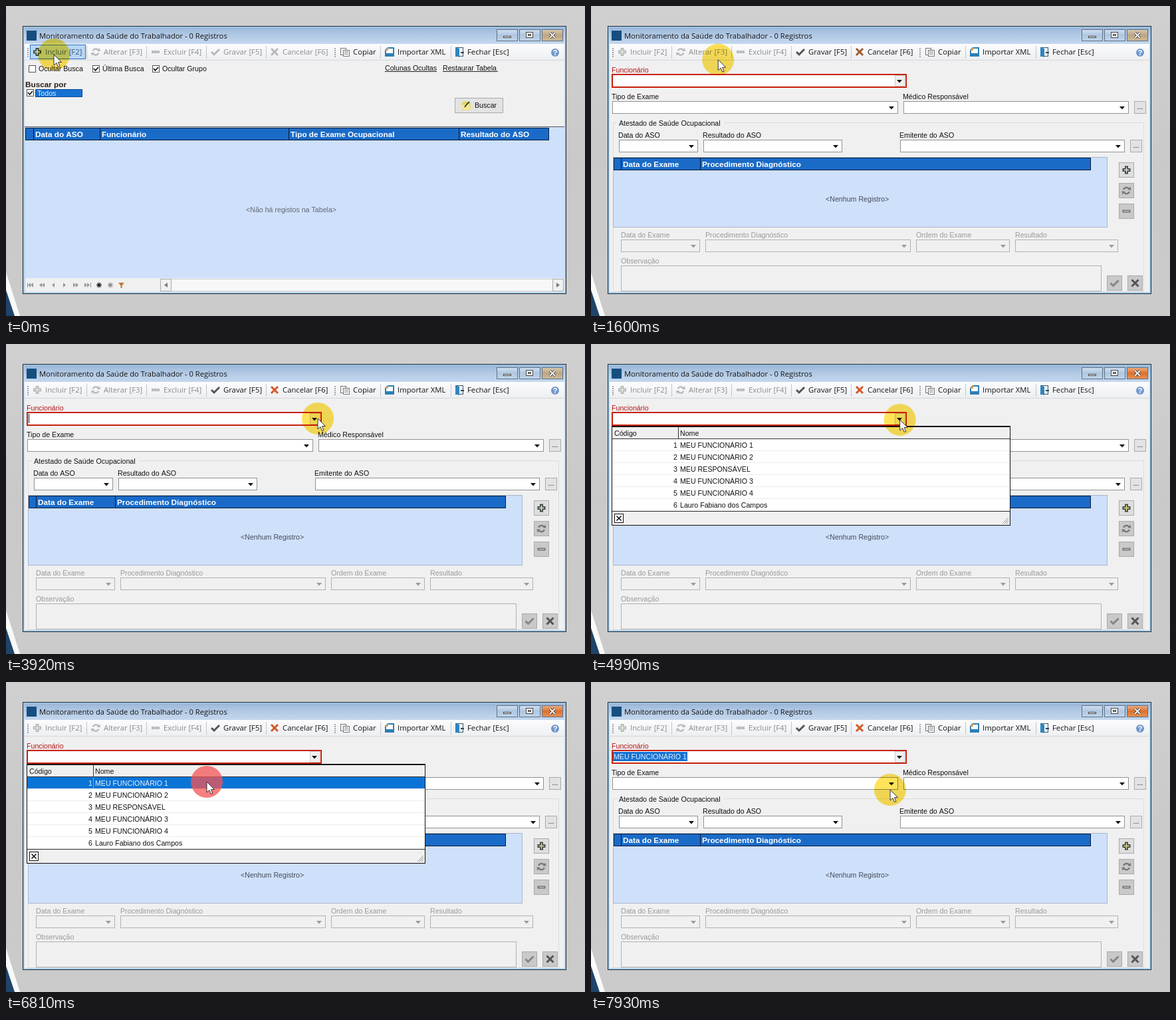
Recreate the animation shown at these times as an HTML page with a canvas. Size 871x466 px, loop 8 s.

```html
<!DOCTYPE html>
<html lang="pt">
<head>
<meta charset="utf-8">
<style>
html, body { margin: 0; width: 100%; height: 100%; overflow: hidden; }
canvas { display: block; }
</style>
</head>
<body>
<canvas id="stage" width="871" height="466"></canvas>
<script>
const g = document.getElementById('stage').getContext('2d');
const LOOP = 8000;
const FORM_AT = 1260, CARET_AT = 3710, LIST_AT = 4060, PICK_AT = 6980;
const UI = '11.3px "Open Sans", sans-serif';
const TITLE = '11.2px "Open Sans", sans-serif';
const SANS = '10.65px "Liberation Sans", Arial, sans-serif';
const BOLD = 'bold 11.75px "Liberation Sans", Arial, sans-serif';
const FACE = '#f0f0f0', BLUE = '#1a6bc8', PALE = '#cfe0fb', GREY = '#8b8b8b', OFF = '#9a9a9a';

// Pointer stops: time, x, y
const path = [
  [0, 72, 73], [70, 72, 73], [610, 98, 70], [1300, 98, 70], [2300, 527, 119], [2650, 527, 119],
  [3500, 469, 112], [4780, 469, 112], [5540, 446, 122], [5680, 444, 123], [6500, 302, 150],
  [7050, 302, 150], [7860, 450, 162], [8000, 450, 162]
];
const clicks = [[1010, 1150], [3950, 4130], [6680, 6980]];

function rect(x, y, w, h, fill, edge, line = 1) {
  if (fill) { g.fillStyle = fill; g.fillRect(x, y, w, h); }
  if (edge) {
    g.strokeStyle = edge; g.lineWidth = line;
    g.strokeRect(x + line / 2, y + line / 2, w - line, h - line);
  }
}

function text(s, x, y, color = '#111', font = SANS, align = 'left') {
  g.font = font; g.fillStyle = color; g.textAlign = align;
  g.fillText(s, x, y);
}

function poly(points, fill) {
  g.beginPath();
  points.forEach(p => g.lineTo(...p));
  g.closePath();
  g.fillStyle = fill; g.fill();
}

function stroke(points, color, width = 1) {
  g.beginPath();
  points.forEach((p, i) => i ? g.lineTo(...p) : g.moveTo(...p));
  g.strokeStyle = color; g.lineWidth = width; g.stroke();
}

function vfade(y0, y1, ...colors) {
  const f = g.createLinearGradient(0, y0, 0, y1);
  colors.forEach((c, i) => f.addColorStop(i / (colors.length - 1), c));
  return f;
}

const icons = {
  plus(x, y, c) {
    stroke([[x - 6, y], [x + 6, y]], c, 5); stroke([[x, y - 6], [x, y + 6]], c, 5);
    stroke([[x - 4, y], [x + 4, y]], '#dfe6d8', 1.6); stroke([[x, y - 4], [x, y + 4]], '#dfe6d8', 1.6);
  },
  minus(x, y, c) { rect(x - 6, y - 2, 12, 4, c); stroke([[x - 4, y], [x + 4, y]], '#ccc'); },
  cycle(x, y, c) {
    g.strokeStyle = c; g.lineWidth = 2.4;
    for (const a of [3.5, 0.35]) { g.beginPath(); g.arc(x, y, 4.6, a, a + 2.2); g.stroke(); }
    poly([[x + 2, y - 1], [x + 7, y - 1], [x + 6, y - 6]], c);
    poly([[x - 2, y + 1], [x - 7, y + 1], [x - 6, y + 6]], c);
  },
  check(x, y, c) { stroke([[x - 6, y], [x - 2, y + 4], [x + 6, y - 4]], c, 3); },
  cross(x, y, c) {
    stroke([[x - 5, y - 5], [x + 5, y + 5]], c, 3); stroke([[x - 5, y + 5], [x + 5, y - 5]], c, 3);
  },
  copy(x, y) {
    rect(x - 7, y - 6, 9, 11, '#f5f5f5', '#777'); rect(x - 3, y - 3, 10, 10, '#fff', '#777');
    for (let i = 0; i < 3; i++) rect(x - 1, y - 1 + i * 2, 6, 1, '#999');
  },
  sheet(x, y) {
    poly([[x - 3, y - 7], [x + 7, y - 7], [x + 7, y + 7], [x - 7, y + 7], [x - 7, y - 3]], '#2c7fb5');
    poly([[x - 2, y - 5], [x + 5, y - 5], [x + 5, y + 2], [x - 5, y + 2], [x - 5, y - 2]], '#fff');
    poly([[x - 7, y - 2], [x - 2, y - 2], [x - 2, y - 7]], '#e6a34a');
  },
  door(x, y) {
    rect(x - 6, y - 7, 12, 14, '#e9f2f8', '#456');
    poly([[x - 6, y - 7], [x, y - 5], [x, y + 8], [x - 6, y + 6]], '#2e86c0');
    rect(x + 2, y, 5, 2, '#345');
  }
};

function arrow(x, y, c = '#111') { poly([[x - 4, y - 2], [x + 4, y - 2], [x, y + 2.5]], c); }

function combo(x, y, right, on = true) {
  rect(x, y, right - x, 19, on ? '#fff' : FACE, on ? '#8f9297' : '#b2b2b2');
  arrow(right - 10, y + 10, on ? '#111' : '#999');
}

function button(x, y, w, h, fill = '#e3e3e3') { rect(x, y, w, h, fill, '#aaa'); }

function checkbox(x, y, on, label) {
  rect(x, y, 11, 11, '#fff', '#555');
  if (on) stroke([[x + 2, y + 5], [x + 4.5, y + 8], [x + 9, y + 3]], '#111', 1.7);
  if (label) text(label, x + 15, y + 9);
}

function header(x, y, right, cols) {
  rect(x, y, right - x, 19, BLUE, '#0a1c38');
  for (const [cx, label] of cols) {
    rect(cx, y, 1, 19, '#0a1c38');
    text(label, cx + 3, y + 14, '#fff', BOLD);
  }
}

function backdrop() {
  rect(0, 0, 871, 466, vfade(0, 466, '#d0d0d0', '#c9c9c9', '#cbcbcb'));
  poly([[0, 400], [21, 466], [0, 466]], '#f9f9f9');
  poly([[0, 427], [13, 466], [0, 466]], '#1f4468');
}

function frame(t) {
  rect(25, 30, 818, 403, '#b9d1ea', '#1f2831');
  rect(26, 31, 816, 401, null, '#9fd0ee');
  rect(27, 32, 814, 25, vfade(32, 57, '#9ab7d9', '#b3cae5', '#c4d8ee'));
  rect(31, 37, 15, 15, '#164e80');
  text('Monitoramento da Saúde do Trabalhador - 0 Registros', 50, 49, '#151515', TITLE);

  const hot = t > 4300;
  const close = hot ? vfade(35, 53, '#f0b284', '#dc702f', '#e89455') : vfade(35, 53, '#ddceb4', '#bda582', '#d0bc99');
  [738, 772, 806].forEach((x, i) =>
    rect(x, 35, 32, 18, i < 2 ? vfade(35, 53, '#d3e2f2', '#afc6e0', '#c3d7ec') : close, '#5f7186'));
  rect(748, 45, 12, 3, '#fff', '#444');
  rect(782, 39, 11, 9, '#fff', '#444'); rect(785, 42, 5, 3, '#bbb', '#444');
  stroke([[818, 40], [826, 48]], '#333', 3.6); stroke([[818, 48], [826, 40]], '#333', 3.6);
  stroke([[818, 40], [826, 48]], '#fff', 1.8); stroke([[818, 48], [826, 40]], '#fff', 1.8);
}

function grip(x) { for (let y = 63; y < 77; y += 3) rect(x, y, 2, 2, '#a4a8af'); }

function toolbar(t) {
  const form = t >= FORM_AT, pressed = t >= 1080 && !form;
  rect(28, 57, 812, 25, vfade(57, 82, '#fcfcfd', '#eceef1'));
  rect(28, 81, 812, 1, '#d5d7da');
  grip(32); grip(494);
  for (const x of [121, 211, 301, 391, 563, 669]) rect(x, 60, 1, 19, '#c3c6ca');
  if (!form) rect(36, 58, 84, 22, pressed ? '#72abe6' : '#b9d6f5', '#286fc0');
  const items = [
    [59, 'Incluir [F2]', 'plus', !form, '#34483a'], [147, 'Alterar [F3]', 'cycle', false],
    [237, 'Excluir [F4]', 'minus', false], [327, 'Gravar [F5]', 'check', form, '#555'],
    [416, 'Cancelar [F6]', 'cross', form, t > 3900 ? '#d4592a' : '#a05c32'], [522, 'Copiar', 'copy', true],
    [589, 'Importar XML', 'sheet', true], [694, 'Fechar [Esc]', 'door', true]
  ];
  items.forEach(([x, label, icon, on, tint], i) => {
    icons[icon](x - 12, 69, on ? tint : '#b9b9b9');
    const color = !on ? GREY : i ? '#151515' : pressed ? '#c8e0fa' : '#3e5a7c';
    text(label, x, 73, color, UI);
  });
  g.beginPath(); g.arc(826, 70, 6, 0, 7); g.fillStyle = '#6f97cb'; g.fill();
  text('?', 826, 74, '#fff', BOLD, 'center');
}

function navBar() {
  rect(29, 409, 811, 21, FACE);
  [37, 54, 71, 88, 105, 122].forEach((x, i) => {
    const d = i < 3 ? -1 : 1, c = '#9499a1';
    const tri = o => poly([[x + o - 2 * d, 416], [x + o + 2 * d, 419.5], [x + o - 2 * d, 423]], c);
    if (i === 2 || i === 3) tri(0); else { tri(-2); tri(2); }
    if (i === 0 || i === 5) rect(x + d * 5, 416, 1, 7, c);
  });
  for (const [x, c] of [[140, '#111'], [157, '#888']])
    for (let a = 0; a < 4; a++) {
      const dx = 4 * Math.cos(a * Math.PI / 4), dy = 4 * Math.sin(a * Math.PI / 4);
      stroke([[x - dx, 419.5 - dy], [x + dx, 419.5 + dy]], c, 1.2);
    }
  poly([[169, 416], [178, 416], [174.5, 420], [174.5, 424], [172.5, 424], [172.5, 420]], '#b9772c');
  rect(232, 410, 607, 19, '#f7f7f7', '#d0d0d0');
  button(232, 410, 17, 19, FACE); button(822, 410, 17, 19, FACE);
  poly([[243, 416], [243, 423], [238, 419.5]], '#777');
  poly([[828, 416], [828, 423], [833, 419.5]], '#777');
}

function listScreen(t) {
  rect(28, 82, 812, 100, FACE);
  checkbox(34, 89, false, 'Ocultar Busca');
  checkbox(130, 89, true, 'Última Busca');
  checkbox(220, 89, true, 'Ocultar Grupo');
  [[570, 'Colunas Ocultas', 78], [657, 'Restaurar Tabela', 83]].forEach(([x, s, w]) => {
    text(s, x, 97); rect(x, 98, w, 1, '#222');
  });
  text('Buscar por', 29, 122, t > 970 ? '#5a1d10' : '#2b1c14', BOLD);
  checkbox(31, 125, true);
  rect(44, 125, 71, 12, '#1672d2', '#0a4c9a');
  text('Todos', 47, 135, '#d9eaff');
  button(675, 138, 73, 23);
  poly([[686, 145], [691, 143], [699, 146], [699, 156], [687, 157]], '#e8d35c');
  poly([[685, 149], [697, 147], [699, 156], [688, 157]], '#f3e694');
  stroke([[690, 152], [693, 148], [697, 144]], '#3a4a2a', 2);
  text('Buscar', 705, 153);
  rect(29, 182, 811, 227, PALE);
  rect(28, 181, 812, 1, '#555');
  header(29, 183, 817, [[41, 'Data do ASO'], [141, 'Funcionário'], [425, 'Tipo de Exame Ocupacional'], [681, 'Resultado do ASO']]);
  text('<Não há registos na Tabela>', 361, 310, '#626872');
  navBar();
}

function formScreen(t) {
  rect(28, 82, 812, 348, FACE);
  text('Funcionário', 31, 100, '#b01818');
  rect(31, 102, 444, 21, '#fff', '#c8200c', 2);
  rect(457, 104, 15, 17, FACE, '#ccc');
  arrow(464, 113);
  if (t >= PICK_AT) {
    rect(33, 105, 112, 14, '#1672d2');
    text('MEU FUNCIONÁRIO 1', 34, 116, '#e6f2ff');
  } else if (t >= CARET_AT && t < LIST_AT) rect(34, 105, 1, 14, '#111');

  text('Tipo de Exame', 31, 140); combo(32, 143, 462);
  text('Médico Responsável', 469, 140); combo(470, 143, 809);
  rect(33, 175, 799, 255, null, '#dcdcdc');
  rect(39, 171, 161, 10, FACE);
  text('Atestado de Saúde Ocupacional', 42, 180);
  [[41, 'Data do ASO', 161], [168, 'Resultado do ASO', 378], [464, 'Emitente do ASO', 803]].forEach(([x, s, r]) => {
    text(s, x, 198); combo(x + 1, 201, r);
  });
  for (const [x, y] of [[817, 143], [811, 201]]) {
    button(x, y, 18, 19);
    text('...', x + 9, y + 12, '#111', SANS, 'center');
  }

  rect(33, 227, 744, 106, PALE, '#a7b6cc');
  header(34, 228, 752, [[45, 'Data do Exame'], [164, 'Procedimento Diagnóstico']]);
  text('<Nenhum Registro>', 353, 294, '#454c58');
  ['plus', 'cycle', 'minus'].forEach((name, i) => {
    button(794, 235 + i * 31, 23, 23, i ? '#c9c9c9' : '#dedede');
    icons[name](805.5, 246.5 + i * 31, i ? '#777' : '#3b4540');
  });
  if (t > 4300) { rect(801, 246, 9, 1, '#e4d36a'); rect(805, 242, 1, 9, '#e4d36a'); }

  [[45, 'Data do Exame', 164], [172, 'Procedimento Diagnóstico', 481], [489, 'Ordem do Exame', 630], [638, 'Resultado', 793]].forEach(([x, s, r]) => {
    text(s, x, 348, OFF); combo(x, 351, r, false);
  });
  text('Observação', 45, 387, OFF);
  rect(45, 390, 723, 39, FACE, '#b2b2b2');
  button(776, 405, 23, 23, '#c9c9c9'); icons.check(787.5, 416.5, '#858585');
  button(807, 405, 23, 23, '#c9c9c9'); icons.cross(818.5, 416.5, '#555');
}

function dropList(t) {
  rect(31, 123, 600, 150, '#fff', '#111');
  rect(31, 123, 600, 2, '#111');
  rect(32, 125, 598, 18, FACE);
  rect(32, 142, 598, 1, '#333'); rect(131, 125, 1, 18, '#333');
  text('Código', 35, 138); text('Nome', 134, 138);
  const names = ['MEU FUNCIONÁRIO 1', 'MEU FUNCIONÁRIO 2', 'MEU RESPONSÁVEL', 'MEU FUNCIONÁRIO 3', 'MEU FUNCIONÁRIO 4', 'Lauro Fabiano dos Campos'];
  names.forEach((name, i) => {
    const y = 143 + i * 18, chosen = !i && t > 6350, color = chosen ? '#e6f2ff' : '#111';
    rect(32, y + 17, 598, 1, '#ececec');
    if (chosen) { rect(32, y, 598, 17, '#0a74d6'); rect(131, y, 1, 17, '#5ea8ea'); }
    text(i + 1, 130, y + 13, color, SANS, 'right');
    text(name, 134, y + 13, color);
  });
  rect(32, 251, 598, 21, FACE); rect(32, 251, 598, 1, '#333');
  rect(35, 255, 14, 14, '#fff', '#111');
  stroke([[38.5, 258.5], [45.5, 265.5]], '#111', 1.6); stroke([[38.5, 265.5], [45.5, 258.5]], '#111', 1.6);
  for (const d of [3, 6, 9]) stroke([[628 - d, 270], [628, 270 - d]], '#999');
}

function pointer(t) {
  const i = path.findIndex((p, k) => k && p[0] >= t);
  const [t0, x0, y0] = path[i - 1], [t1, x1, y1] = path[i];
  const u = (t - t0) / (t1 - t0), e = u * u * (3 - 2 * u);
  const x = x0 + (x1 - x0) * e, y = y0 + (y1 - y0) * e;
  const down = clicks.some(([a, b]) => t >= a && t < b);
  g.save();
  // The resting halo tints what lies below; the click halo covers it.
  if (!down) g.globalCompositeOperation = 'multiply';
  g.beginPath(); g.arc(x, y, 24, 0, 7);
  g.fillStyle = down ? 'rgba(245,85,85,.75)' : 'rgba(255,222,60,.85)';
  g.fill();
  g.restore();
  g.save();
  g.translate(x, y);
  poly([[0, 0], [0, 16], [4, 12.5], [6.5, 18.5], [9, 17.5], [6.5, 11.7], [11.5, 11.5]], '#fff');
  g.strokeStyle = '#333'; g.lineWidth = 1; g.stroke();
  g.restore();
}

function draw(now) {
  const t = now % LOOP;
  backdrop();
  frame(t);
  toolbar(t);
  if (t < FORM_AT) listScreen(t); else formScreen(t);
  if (t >= LIST_AT && t < PICK_AT) dropList(t);
  pointer(t);
  requestAnimationFrame(draw);
}
requestAnimationFrame(draw);
</script>
</body>
</html>
```
